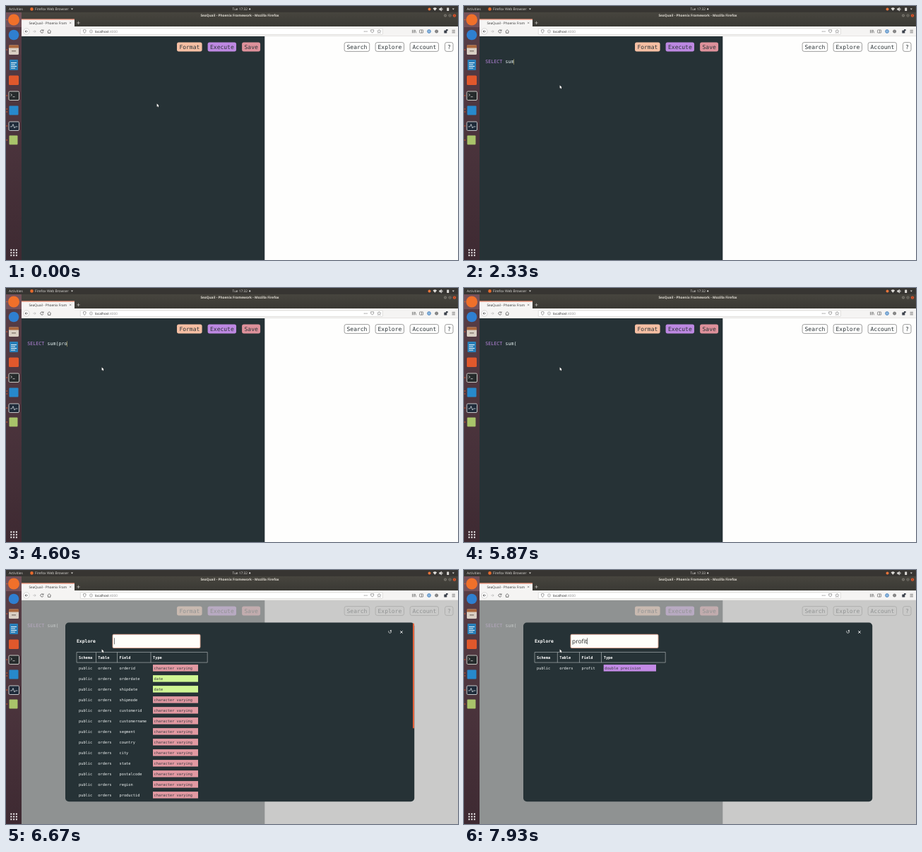
Recreate the animation shown at these times as an HTML page with a canvas. Size 640 px wide and 360 px high, loop 8000 ms.

```html
<!DOCTYPE html>
<html lang="en">
<head>
<meta charset="utf-8">
<title>SQL editor</title>
<style>
html, body { margin: 0; width: 100%; height: 100%; overflow: hidden; background: #fefefd }
canvas { display: block }
</style>
</head>
<body>
<canvas id="stage" width="640" height="360"></canvas>
<script>
const ctx = document.getElementById('stage').getContext('2d');
const LOOP = 8000;
const MONO = '"DejaVu Sans Mono", monospace', SANS = '"Open Sans", sans-serif';
const DARK = '#263236', PINK = '#e299a2', GREEN = '#d0f694', PURPLE = '#c38ae6';
ctx.textRendering = 'geometricPrecision';

// [time, editor content] and [time, search content]
const editorKeys = [
  [800, ''], [930, 'S'], [1000, 'SE'], [1070, 'SEL'], [1130, 'SELE'], [1200, 'SELEC'],
  [1330, 'SELECT'], [1530, 'SELECT '], [1930, 'SELECT s'], [2070, 'SELECT su'],
  [2270, 'SELECT sum'], [2670, 'SELECT sum('], [3130, 'SELECT sum(p'], [3270, 'SELECT sum(pr'],
  [3670, 'SELECT sum(pro'], [3800, 'SELECT sum(prof'], [4600, 'SELECT sum(pro'],
  [4750, 'SELECT sum(pr'], [4900, 'SELECT sum(p'], [5050, 'SELECT sum(']
];
const searchKeys = [...'profit'].map((c, i) => [7130 + i * 130, 'profit'.slice(0, i + 1)]);
const OPEN = 5930, LOADED = 6130, MINUTE = 7500;

const fields = ('orderid orderdate shipdate shipmode customerid customername segment country city ' +
  'state postalcode region productid category subcategory productname sales quantity discount profit').split(' ');

const latest = (keys, t) => keys.filter(k => k[0] <= t).pop();

function rect(x, y, w, h, fill) {
  ctx.fillStyle = fill;
  ctx.fillRect(x, y, w, h);
}

function box(x, y, w, h, r, fill, stroke, width = 0.6) {
  ctx.beginPath();
  ctx.roundRect(x, y, w, h, r);
  if (fill) { ctx.fillStyle = fill; ctx.fill(); }
  if (stroke) { ctx.strokeStyle = stroke; ctx.lineWidth = width; ctx.stroke(); }
}

const dot = (x, y, r, fill, stroke, width) => box(x - r, y - r, 2 * r, 2 * r, r, fill, stroke, width);

function text(s, x, y, size, fill, font = MONO, weight = 'normal', align = 'left') {
  ctx.font = `${weight} ${size}px ${font}`;
  ctx.textAlign = align;
  ctx.fillStyle = fill;
  ctx.fillText(s, x, y);
}

function path(d, stroke, fill, width = 0.7) {
  const p = new Path2D(d);
  if (fill) { ctx.fillStyle = fill; ctx.fill(p); }
  if (stroke) { ctx.strokeStyle = stroke; ctx.lineWidth = width; ctx.stroke(p); }
}

function vertical(y0, y1, c0, c1) {
  const g = ctx.createLinearGradient(0, y0, 0, y1);
  g.addColorStop(0, c0);
  g.addColorStop(1, c1);
  return g;
}

function drawDock() {
  rect(0, 9, 22, 351, vertical(9, 360, '#583e47', '#3e2a32'));
  rect(0, 9, 22, 21, '#75525a');
  dot(11, 19.5, 8, '#f0702a');
  dot(11, 41, 7.3, '#2f7fd0');
  box(4, 55.5, 14, 13.5, 1.5, '#d9cfc4');
  rect(4, 55.5, 14, 4, '#a9663c');
  rect(8, 63, 6, 1.5, '#8d8178');
  box(5, 76, 12, 15, 1, '#2a7fb8');
  for (let i = 0; i < 4; i++) rect(7, 80 + i * 2.5, i % 2 ? 6 : 8, 1, '#e8f2f8');
  box(4, 98.5, 14, 13.5, 1.5, '#e0582c');
  box(4, 121, 14.5, 12.5, 1.5, '#262b2c', '#c9c9c4', 1);
  path('M6.5 124.5l2 1.6-2 1.6M9.5 128.7h3', '#eee');
  box(4.5, 141.5, 13, 13, 1, '#2789cc');
  box(4, 164, 14.5, 12.5, 1.5, '#1f2b3a', '#c4c7c9', 1);
  path('M6 171h2.5l1.5-3.5 2 5.5 1.5-2h3', '#e9eef2');
  box(4.5, 183.5, 12, 13, 1, '#a9c46a');
  for (const y of [19.5, 62, 127, 146, 150, 170, 190]) dot(1.3, y, 0.8, '#e9622f');
  for (let i = 0; i < 9; i++) rect(6.3 + i % 3 * 3.8, 344.8 + (i / 3 | 0) * 3.8, 2, 2, '#f3f0f1');
}

function drawDesktopBar(t) {
  rect(0, 0, 640, 9, '#373532');
  text('Activities', 4, 6.2, 4.8, '#dedcd8', SANS);
  dot(36.5, 4.4, 2.3, '#e66a2c');
  text('Firefox Web Browser', 41, 6.2, 4.95, '#dedcd8', SANS);
  path('M92 3.6h3l-1.5 1.9z', null, '#dedcd8');
  text(t < MINUTE ? 'Tue 17:32' : 'Tue 17:33', 320.5, 6.2, 4.8, '#dedcd8', SANS);
  dot(345.2, 4.4, 1.1, '#dedcd8');
  dot(599.5, 4.5, 2, '#e8743a');
  path('M604.5 3.4q2.8-2.2 5.6 0l-2.8 3.4z', null, '#dedcd8');
  path('M613.5 3.6h1.3l1.7-1.5v5l-1.7-1.5h-1.3zM617.5 2.8q1.6 1.7 0 3.4', '#dedcd8', '#dedcd8', 0.5);
  box(624.2, 2.4, 3, 4.6, 0.4, '#dedcd8');
  path('M631.8 3.6h3l-1.5 1.9z', null, '#dedcd8');
}

function drawTitleBar() {
  rect(22, 9, 618, 20, vertical(9, 29, '#47453e', '#3a3934'));
  text('SeaQuail - Phoenix Framework - Mozilla Firefox', 331, 15.2, 4.78, '#dfdbd2', SANS, 'bold', 'center');
  dot(622, 13.6, 2.1, '#77746c');
  dot(628.5, 13.6, 2.1, '#77746c');
  dot(635, 13.6, 2.2, '#e6562a');
  path('M621 13.6h2', '#33302b', null, 0.5);
  box(627.7, 12.8, 1.6, 1.6, 0, null, '#33302b', 0.4);
  path('M634.2 12.8l1.6 1.6m0-1.6l-1.6 1.6', '#33302b', null, 0.5);
}

function drawBrowser() {
  drawTitleBar();
  rect(22, 18.5, 75, 10.5, '#f6f5f4');
  rect(22, 18.5, 75, 0.9, '#e3603a');
  text('SeaQuail - Phoenix Fram', 32.5, 25.6, 4.72, '#2d2d2d', SANS);
  path('M90 22.7l2.4 2.4m0-2.4l-2.4 2.4', '#555', null, 0.5);
  path('M100.3 23.9h4.4m-2.2-2.2v4.4', '#dcdad5', null, 0.6);

  rect(22, 29, 618, 14, '#f5f4f3');
  rect(22, 42.6, 618, 0.4, '#cfcdca');
  dot(29, 36, 4.2, '#fdfdfd', '#b5b3b0', 0.5);
  path('M31 36h-4m1.7-1.7l-1.7 1.7 1.7 1.7', '#444');
  path('M38.2 36h4m-1.7-1.7l1.7 1.7-1.7 1.7', '#b4b4b4');
  path('M52.6 34.7a2.1 2.1 0 1 0 .3 2M53 33.4v1.7h-1.7', '#444');
  path('M58.6 36l2.6-2.3 2.6 2.3M59.5 36v2.4h3.4v-2.4', '#444');

  box(105.3, 31.8, 428, 8.6, 0.8, '#fff', '#c4c2bf', 0.5);
  path('M109.4 34l1.9-.6 1.9.6q0 3.4-1.9 4.5-1.9-1.1-1.9-4.5z', '#666', null, 0.6);
  dot(120.5, 36, 2.1, null, '#777', 0.5);
  path('M120.5 35.7v1.4M120.5 34.6v.5', '#777', null, 0.5);
  text('localhost', 125.8, 37.7, 4.78, '#222', SANS);
  text(':4000', 145.8, 37.7, 4.78, '#8a8a8a', SANS);
  for (let i = 0; i < 3; i++) dot(507.3 + i * 1.9, 36, 0.55, '#555');
  path('M516.6 33.8h4v2.2q-2 3.5-4 0z', '#666', null, 0.6);
  path('M528.3 33.4l.8 1.7 1.8.2-1.3 1.3.3 1.8-1.6-.9-1.6.9.3-1.8-1.3-1.3 1.8-.2z', '#666', null, 0.5);

  path('M575.4 33.8v4.5m1.5-4.5v4.5m1.5-4.5v4.5m.8-4.4l1.5 4.4', '#555', null, 0.6);
  box(585.6, 33.9, 5, 4.2, 0.5, null, '#555', 0.6);
  rect(588, 34, 0.6, 4, '#555');
  dot(599, 36, 2.4, '#8fb9e0', '#2f6fb0', 0.7);
  dot(609.6, 36, 2.1, '#8d8d8d', '#555', 0.6);
  box(620.3, 34.6, 4, 3.8, 0.5, '#3c424c');
  rect(623, 33, 2.6, 2.2, '#3c424c');
  path('M631.5 34.3h4.4m-4.4 1.8h4.4m-4.4 1.8h4.4', '#444', null, 0.6);
}

function button(label, x, fill, stroke) {
  box(x, 51.6, label.length * 4.816 + 6.7, 12.8, 2.6, fill, stroke, 0.67);
  text(label, x + 3.4, 60.8, 8, '#2b3337');
}

function drawPage(t) {
  rect(22, 43, 344.5, 317, DARK);
  rect(366.5, 43, 273.5, 317, '#fefefd');
  button('Format', 242, '#f6bfa3');
  button('Execute', 285.6, '#bd88e2');
  button('Save', 334.1, '#de919b');
  button('Search', 479.1, '#fefefd', '#707070');
  button('Explore', 523.1, '#fefefd', '#707070');
  button('Account', 572.1, '#fefefd', '#707070');
  button('?', 621.5, '#fefefd', '#707070');

  const key = latest(editorKeys, t);
  if (!key) return;
  const [time, code] = key, x = 30.3, advance = 4.014;
  const word = code.startsWith('SELECT') ? 6 : 0;
  text(code.slice(0, word), x, 81.3, 6.667, '#b684db');
  text(code.slice(word), x + word * advance, 81.3, 6.667, '#e6f3f3');
  if (t < OPEN && (t - time) % 1060 < 530) rect(x + code.length * advance, 75.3, 0.5, 7.8, '#d9c77a');
}

function typeOf(field) {
  if (field.endsWith('date')) return ['date', GREEN];
  if (/^(sales|quantity|discount|profit)$/.test(field)) return ['double precision', PURPLE];
  return ['character varying', PINK];
}

function drawTable(query) {
  const rows = fields.filter(f => f.includes(query));
  const wide = rows.some(f => f.length > 8);
  const edges = wide ? [100, 127.3, 157.5, 205] : [100, 132.2, 163.5, 194.7];
  const size = 5.333, right = 285.2;
  box(100, 116.5, right - 100, 14.6, 0, null, '#b9c0c2', 0.6);
  ['Schema', 'Table', 'Field', 'Type'].forEach((name, i) => {
    if (i) rect(edges[i] - 0.3, 116.5, 0.6, 14.6, '#b9c0c2');
    text(name, edges[i] + 3, 125.6, size, '#fff', MONO, 'bold');
  });
  rows.slice(0, 13).forEach((field, i) => {
    const y = 140.7 + i * 15, [type, color] = typeOf(field);
    ['public', 'orders', field].forEach((s, j) => text(s, edges[j] + 3, y, size, '#eef2f2'));
    rect(edges[3] + 3, y - 6.6, 272 - edges[3] - 3, 9.5, color);
    text(type, edges[3] + 4.5, y, size, '#3a3c42');
  });
  if (rows.length > 13) box(576, 75.5, 2, 149, 1, '#e4613a');
}

function drawModal(t) {
  rect(22, 43, 618, 317, 'rgba(183,183,182,.72)');
  box(84, 74.6, 494.2, 253.6, 5, DARK);
  text('↺', 543.7, 90.2, 7, '#fff', '"DejaVu Sans", sans-serif', 'normal', 'center');
  path('M558.2 86.3l3.4 3.4m0-3.4l-3.4 3.4', '#fff', null, 0.9);
  text('Explore', 100, 102.9, 6.4, '#fff', MONO, 'bold');

  const query = (latest(searchKeys, t) || [0, ''])[1];
  box(151, 91.3, 124, 19.2, 1.6, '#fffefa', '#dfa48f', 0.9);
  text(query, 153, 103.6, 8.4, '#222', SANS);
  rect(153 + (query ? ctx.measureText(query).width : 0), 96.3, 0.6, 9, '#222');
  // results follow the typing with a short delay
  if (t >= LOADED) drawTable((latest(searchKeys, t - 70) || [0, ''])[1]);
}

function drawPointer(t) {
  const p = Math.min(1, Math.max(0, (t - 530) / 200)), e = p * p * (3 - 2 * p);
  ctx.save();
  ctx.translate(213.6 - 78 * e, 138.2 - 26 * e);
  path('M0 0v4.6l1-.9.8 1.6.8-.4-.8-1.5h1.4z', '#1a1a1a', null, 0.6);
  path('M0 0v4.6l1-.9.8 1.6.8-.4-.8-1.5h1.4z', null, '#fff');
  ctx.restore();
}

function frame(now) {
  const t = now % LOOP;
  drawBrowser();
  drawPage(t);
  if (t >= OPEN) drawModal(t);
  drawDock();
  drawDesktopBar(t);
  drawPointer(t);
  requestAnimationFrame(frame);
}
requestAnimationFrame(frame);
</script>
</body>
</html>
```
